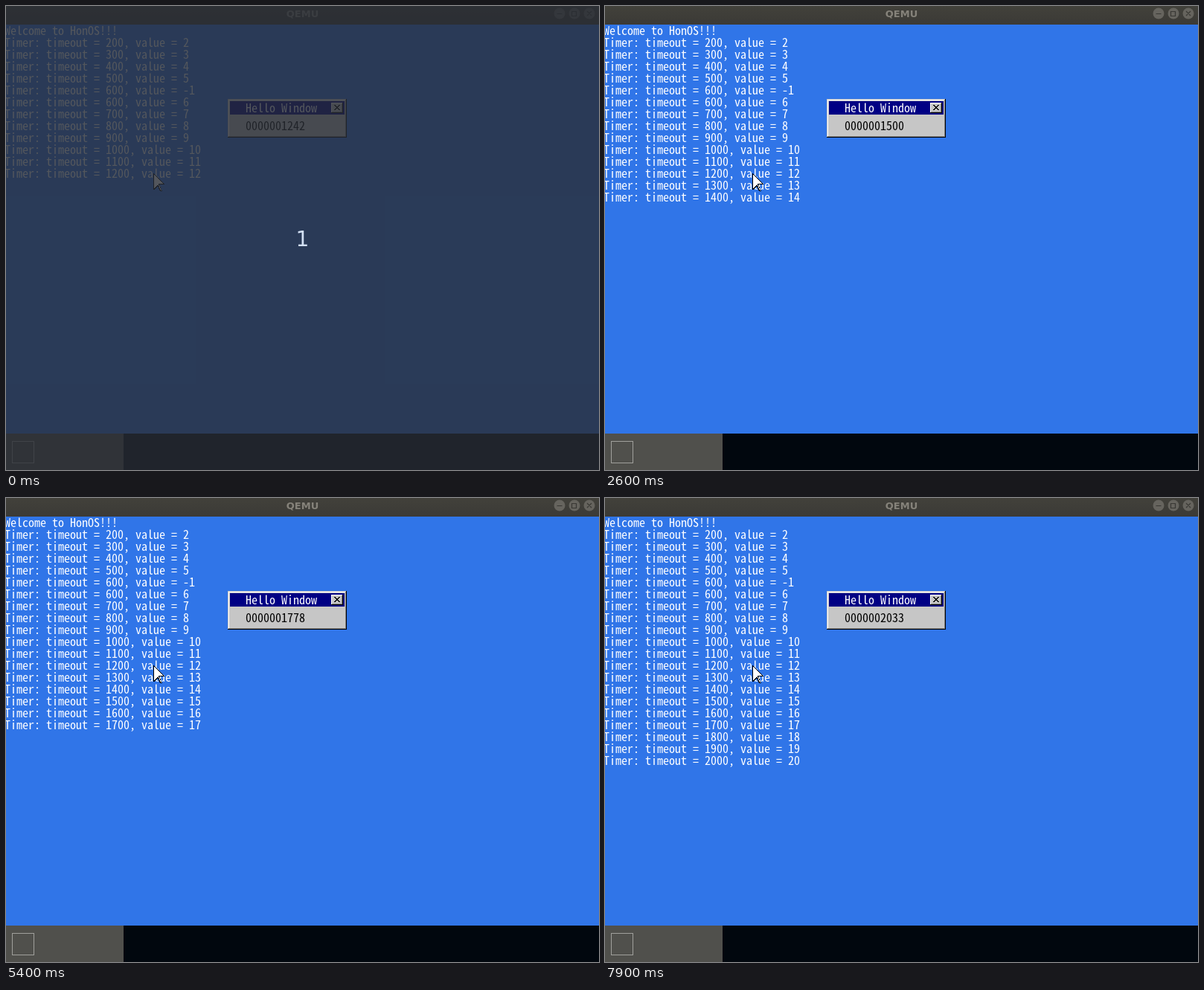
These frames come from a looping animation (797x624 px, 8000 ms). An HTML page:

```html
<!DOCTYPE html>
<html lang="en">
<head>
<meta charset="utf-8">
<title>Timer demo</title>
<style>
  html, body { margin: 0; width: 100%; height: 100%; overflow: hidden; background: #3075e8; }
  svg { display: block; }
  .cell {
    font: 300 16px 'Noto Sans Mono CJK JP', 'Noto Sans CJK JP', 'Noto Sans Mono', monospace;
    font-feature-settings: 'hwid';
    font-kerning: none;
    white-space: pre;
  }
  .ui { font-family: 'DejaVu Sans', sans-serif; text-anchor: middle; }
</style>
</head>
<body>
<svg width="797" height="624" viewBox="0 0 797 624">
  <defs>
    <linearGradient id="bar" x2="0" y2="1">
      <stop stop-color="#42413b"/>
      <stop offset="1" stop-color="#3b3a36"/>
    </linearGradient>
  </defs>

  <!-- Desktop -->
  <rect width="797" height="624" fill="#3075e8"/>
  <rect y="575" width="797" height="49" fill="#01070e"/>
  <rect y="575" width="158" height="49" fill="#50504c"/>
  <rect x="8.5" y="585.5" width="29" height="29" fill="none" stroke="#a0a09c"/>

  <!-- Host title bar -->
  <rect width="797" height="25" fill="url(#bar)"/>
  <text class="ui" x="398.5" y="15" font-size="13" font-weight="700" fill="#85827a">QEMU</text>
  <g fill="#66645e">
    <circle cx="744" cy="10" r="7.5"/>
    <circle cx="764" cy="10" r="7.5"/>
    <circle cx="784" cy="10" r="7.5"/>
  </g>
  <path d="M740.5 10.5h7M760.5 7.5h6v6h-6zM781 7l6 6m0-6l-6 6" fill="none" stroke="#393834" stroke-width="1.2"/>

  <g id="log" class="cell" fill="#fff"></g>

  <!-- Guest window -->
  <g transform="translate(298 125)" shape-rendering="crispEdges">
    <rect width="160" height="52" fill="#000"/>
    <rect width="159" height="51" fill="#c6c6c6"/>
    <rect x="1" y="1" width="158" height="50" fill="#848484"/>
    <rect x="1" y="1" width="157" height="49" fill="#fff"/>
    <rect x="2" y="2" width="156" height="48" fill="#c6c6c6"/>
    <rect x="3" y="3" width="154" height="18" fill="#000084"/>
    <g transform="translate(139 5)">
      <rect width="16" height="14" fill="#000"/>
      <rect width="15" height="13" fill="#fff"/>
      <rect x="1" y="1" width="14" height="12" fill="#848484"/>
      <rect x="1" y="1" width="13" height="11" fill="#c6c6c6"/>
      <path d="M4 3h2v1h1v1h2v-1h1v-1h2v1h-1v1h-1v1h-1v1h1v1h1v1h1v1h-2v-1h-1v-1h-2v1h-1v1h-2v-1h1v-1h1v-1h1v-1h-1v-1h-1v-1h-1z"/>
    </g>
    <text class="cell" x="24" y="18" fill="#fff">Hello Window</text>
    <text class="cell" id="count" x="24" y="42"></text>
  </g>

  <!-- Pointer -->
  <g transform="translate(198 225)" shape-rendering="crispEdges">
    <path d="M0 0L15 15H8L12 24H9L6 17L1 22H0z"/>
    <path d="M1 2L13 14H7V16H8L11 23H10L7 16H5L1 20z" fill="#fff"/>
  </g>

  <g id="veil">
    <rect width="797" height="624" fill="#282c34" fill-opacity=".8"/>
    <text class="ui" x="398.5" y="323" font-size="28" fill="#d3e0f4">1</text>
  </g>
</svg>
<script>
  const LOOP = 8000, STEP = 100;
  // Counter readings: [ms, ticks]
  const marks = [[0, 1242], [100, 1251], [1200, 1359], [2600, 1500],
                 [4200, 1659], [6600, 1898], [7900, 2033]];
  const $ = id => document.getElementById(id);
  const log = $('log'), count = $('count'), veil = $('veil');
  const rows = [];

  function addRow(text, due) {
    const el = document.createElementNS('http://www.w3.org/2000/svg', 'text');
    el.setAttribute('x', -2);
    el.setAttribute('y', 39 + 16 * rows.length);
    el.textContent = text;
    log.append(el);
    rows.push({ el, due });
  }

  const addTimer = (timeout, value) =>
    addRow(`Timer: timeout = ${timeout}, value = ${value}`, timeout);

  addRow('Welcome to HonOS!!!', 0);
  for (let n = 2; n <= 20; n++) {
    if (n === 6) addTimer(600, -1);
    addTimer(n * 100, n);
  }

  function ticksAt(t) {
    let i = 0;
    while (i < marks.length - 2 && marks[i + 1][0] <= t) i++;
    const [t0, a] = marks[i], [t1, b] = marks[i + 1];
    return Math.floor(a + (b - a) * (t - t0) / (t1 - t0));
  }

  function draw(ms) {
    const t = Math.floor(ms % LOOP / STEP) * STEP;
    const ticks = ticksAt(t);
    count.textContent = String(ticks).padStart(10, '0');
    for (const { el, due } of rows) el.style.display = ticks > due ? '' : 'none';
    veil.style.display = t < STEP ? '' : 'none';
  }

  const start = performance.now();
  function loop() {
    draw(performance.now() - start);
    requestAnimationFrame(loop);
  }
  loop();
</script>
</body>
</html>
```
